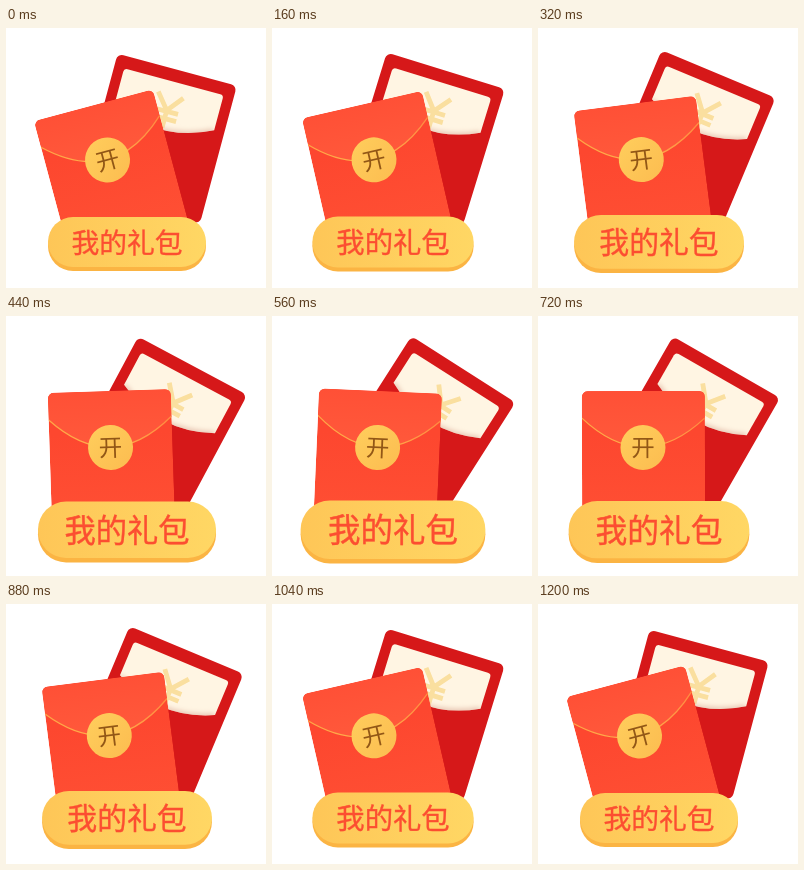
Recreate the animation shown at these times as an HTML page. Size 260 by 260 pixels, loop 1240 ms.

```html
<!DOCTYPE html>
<html lang="zh-CN">
<head>
<meta charset="utf-8">
<style>
  html, body { margin: 0; width: 100%; height: 100%; overflow: hidden; background: #fff; }
  svg { display: block; width: 100vw; height: 100vh; }
  text { font-family: "Noto Sans CJK SC", "Noto Sans CJK", sans-serif; text-anchor: middle; }
</style>
</head>
<body>
<svg viewBox="0 0 260 260">
  <defs>
    <linearGradient id="body" x1="0" y1="0" x2="0" y2="1">
      <stop offset=".3" stop-color="#fd472f"/>
      <stop offset="1" stop-color="#ff5034"/>
    </linearGradient>
    <linearGradient id="flap" x1="0" y1="0" x2="0" y2="1">
      <stop offset="0" stop-color="#ff5036"/>
      <stop offset="1" stop-color="#ff593b"/>
    </linearGradient>
    <linearGradient id="seam">
      <stop offset="0" stop-color="#ffa445"/>
      <stop offset=".5" stop-color="#ffb04c"/>
      <stop offset="1" stop-color="#ff8a40"/>
    </linearGradient>
    <linearGradient id="coin" x1="0" y1="0" x2="1" y2="1">
      <stop offset="0" stop-color="#ffce5c"/>
      <stop offset="1" stop-color="#fcbc50"/>
    </linearGradient>
    <linearGradient id="face">
      <stop offset="0" stop-color="#fec657"/>
      <stop offset="1" stop-color="#ffd764"/>
    </linearGradient>
    <filter id="soft" x="-20%" y="-100%" width="140%" height="300%"><feGaussianBlur stdDeviation="2.6"/></filter>
    <clipPath id="front-clip"><rect x="-61" y="-70" width="123" height="140" rx="6"/></clipPath>
    <clipPath id="paper-clip"><path id="note" d="M-40-63.5H56Q59.5-63.5 59.5-60V-27Q8-1-43.5-27V-60Q-43.5-63.5-40-63.5Z"/></clipPath>
  </defs>

  <g id="back">
    <rect x="-53.6" y="-76" width="123.5" height="143" rx="6" fill="#d61819"/>
    <use href="#note" fill="#fff5e3"/>
    <g clip-path="url(#paper-clip)" fill="none">
      <path d="M-4.5-50L8.5-34L21.5-50M8.5-34V-16M-3.5-33H20.5M-3.5-25.5H20.5" stroke="#fadf9f" stroke-width="4.8"/>
      <path d="M-43.5-26Q8 0 59.5-26" stroke="#dfb5a2" stroke-opacity=".8" stroke-width="5" filter="url(#soft)"/>
    </g>
  </g>

  <g id="front">
    <g clip-path="url(#front-clip)">
      <rect x="-61" y="-70" width="123" height="140" fill="url(#body)"/>
      <path d="M-61-70V-43Q0 15 62-43V-70Z" fill="url(#flap)"/>
      <path d="M-61-43Q0 15 62-43" fill="none" stroke="url(#seam)" stroke-width="1.3"/>
    </g>
    <circle cy="-13.5" r="22.5" fill="url(#coin)"/>
    <text y="-4.8" font-size="23.5" fill="#925716">开</text>
  </g>

  <g id="button">
    <rect x="-79" y="-23" width="158" height="50" rx="25" fill="#fbb443"/>
    <rect x="-79" y="-27" width="158" height="50" rx="25" fill="url(#face)"/>
    <text y="8.6" font-size="27.8" font-weight="500" fill="#fc4e31" stroke="#fc4e31" stroke-width=".35">我的礼包</text>
  </g>
</svg>
<script>
  const LOOP = 1240, HALF = 600, STEP = 40;
  const [back, front, button] = ['back', 'front', 'button'].map(id => document.getElementById(id));

  // cubic-bezier(.44, 0, .78, 1), solved by bisection
  function ease(x) {
    let lo = 0, hi = 1;
    for (let i = 0; i < 24; i++) {
      const s = (lo + hi) / 2, r = 1 - s;
      if (3 * r * r * s * .44 + 3 * r * s * s * .78 + s ** 3 < x) lo = s; else hi = s;
    }
    return lo * lo * (3 - 2 * lo);
  }

  const place = (el, x, y, rest) => el.setAttribute('transform', `translate(${x} ${y}) ${rest}`);

  function draw(now) {
    const t = Math.floor(now % LOOP / STEP) * STEP;
    const p = ease(Math.max(0, 1 - Math.abs(t - HALF) / HALF));
    place(back, 143.7, 113, `rotate(${15 + 18 * p})`);
    place(front, 105, 145, `rotate(${-15 + 18 * p})`);
    place(button, 121, 216, `scale(${1 + .174 * p})`);
  }

  const start = performance.now();
  function tick() {
    draw(performance.now() - start);
    requestAnimationFrame(tick);
  }
  tick();
</script>
</body>
</html>
```
